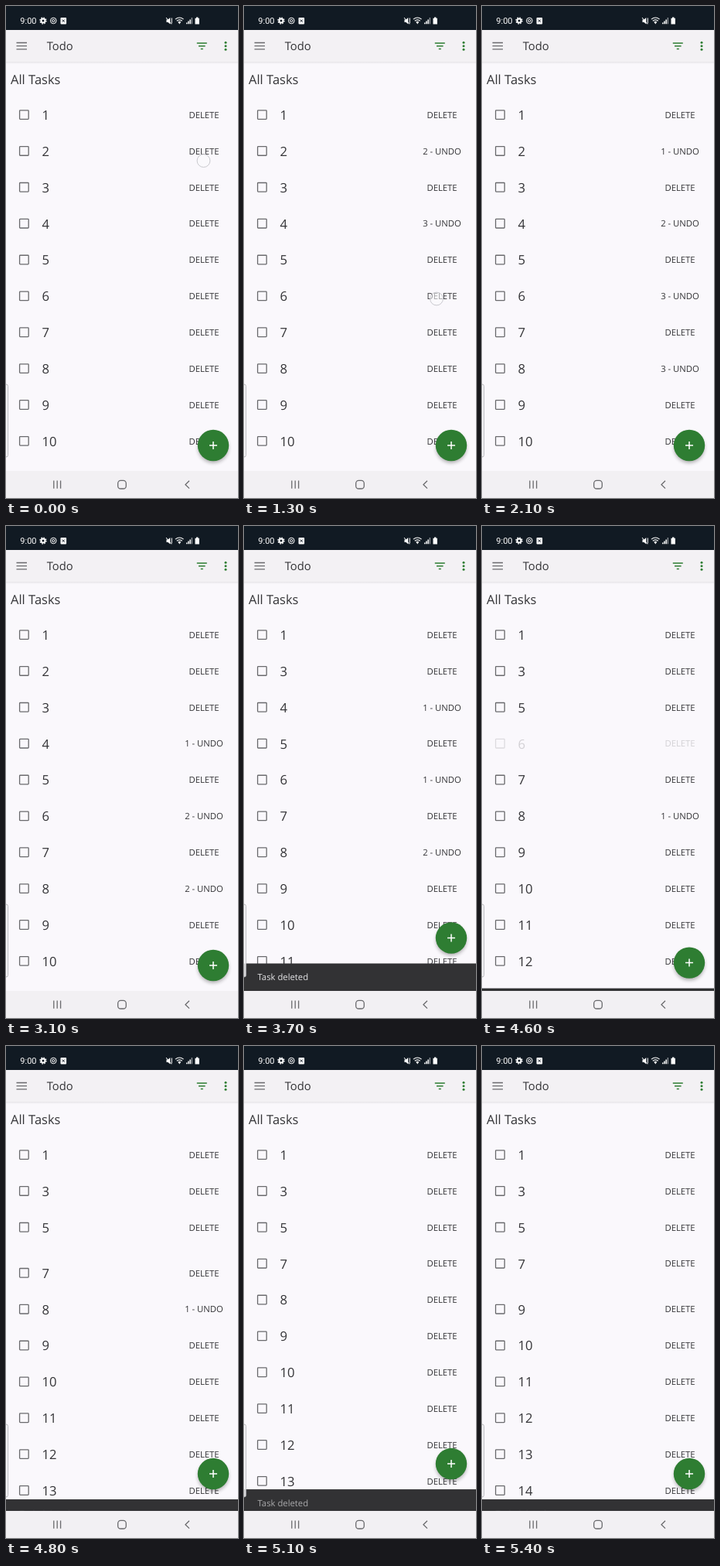
Animation, 300 px wide and 636 px high, one loop 5500 ms. Source, as an HTML page:

```html
<!DOCTYPE html>
<html lang="en">
<head>
<meta charset="utf-8">
<title>Todo</title>
<style>
html, body { margin: 0; width: 100%; height: 100%; overflow: hidden; background: #faf8fc; }
svg { display: block; width: 100%; height: 100%; font-family: "Open Sans", "Noto Sans", sans-serif; fill: #343437; text-rendering: geometricPrecision; }
.clock { font: 11px Roboto, sans-serif; fill: #fff; }
.title { font-size: 14.8px; }
.head { font-size: 16.5px; }
.num { font-size: 16.7px; }
.btn { font-size: 11.3px; text-anchor: middle; }
.note { font-size: 11.3px; fill: #e4e4e6; }
.line { fill: none; stroke: #6a6a6d; stroke-width: 1.3; }
.white { fill: #fff; }
.green { fill: #2e7d32; }
</style>
</head>
<body>
<svg viewBox="0 0 300 636">
  <defs>
    <linearGradient id="edge" x2="0" y2="1">
      <stop offset="0" stop-color="#000" stop-opacity=".08"/>
      <stop offset="1" stop-color="#000" stop-opacity="0"/>
    </linearGradient>
    <filter id="soft" x="-50%" y="-50%" width="200%" height="200%">
      <feGaussianBlur stdDeviation="2.6"/>
    </filter>
  </defs>

  <rect width="300" height="636" fill="#faf8fc"/>
  <text class="head" x="6" y="101">All Tasks</text>
  <g id="list"></g>

  <g id="snack">
    <rect y="565.5" width="300" height="36" fill="#323234"/>
    <text id="note" class="note" x="17.5" y="587">Task deleted</text>
  </g>

  <g id="fab">
    <circle cx="268" cy="571" r="19.5" fill="#000" opacity=".32" filter="url(#soft)"/>
    <circle class="green" cx="268" cy="568" r="20.2"/>
    <path d="M263 568h10M268 563v10" stroke="#fff" stroke-width="1.5"/>
  </g>

  <rect x="-6" y="489" width="8.6" height="94" rx="2.5" fill="#f5f5f7" fill-opacity=".85" stroke="#b4b4b8" stroke-width=".9"/>

  <!-- toolbar -->
  <rect y="72" width="300" height="3" fill="url(#edge)"/>
  <rect y="31" width="300" height="41" fill="#f3f1f4"/>
  <path class="line" d="M13.5 47.5h13.5M13.5 51.7h13.5M13.5 55.9h13.5"/>
  <text class="title" x="52.7" y="57">Todo</text>
  <path d="M246.8 48h13M249 51.7h8.6M251.8 55.4h3" stroke="#2e7d32" stroke-width="1.5"/>
  <g class="green">
    <circle cx="284" cy="47.2" r="1.5"/><circle cx="284" cy="51.7" r="1.5"/><circle cx="284" cy="56.2" r="1.5"/>
  </g>

  <!-- status bar -->
  <rect width="300" height="31" fill="#111a23"/>
  <text class="clock" x="18.3" y="23">9:00</text>
  <g class="white">
    <circle cx="48" cy="19" r="2.5" fill="none" stroke="#fff" stroke-width="2"/>
    <circle cx="48" cy="19" r="4" fill="none" stroke="#fff" stroke-width="1.3" stroke-dasharray="1.6 1.54"/>
    <circle cx="61.3" cy="19" r="3.8" fill="none" stroke="#fff" stroke-width="1"/>
    <circle cx="61.3" cy="19" r="1.6" fill="none" stroke="#fff" stroke-width="1"/>
    <rect x="70.5" y="15" width="7.6" height="8.4" rx="1"/>
    <path d="M72.7 17.6l3.2 3.2m0-3.2l-3.2 3.2" stroke="#111a23"/>
    <path d="M207.5 17.5h2l2.8-2.5v8.4l-2.8-2.5h-2z"/>
    <path d="M207 15l7 8.4M214.3 15.5v7" fill="none" stroke="#fff"/>
    <path d="M219 17.2q5.3-4.4 10.6 0M220.8 19.3q3.5-2.8 7 0" fill="none" stroke="#fff" stroke-width="1.1"/>
    <path d="M222.3 20.6q2-1.5 4 0l-2 2.8z"/>
    <path d="M233 23.3v-1.8h1.5v1.8zM235.2 23.3v-3.8h1.5v3.8zM237.4 23.3v-5.8h1.5v5.8z"/>
    <path d="M239.6 23.3v-8.3h1.5v8.3z" opacity=".5"/>
    <path d="M244.5 15.8h1.5v-1.2h2.4v1.2h1.5v7.8h-5.4z"/>
  </g>

  <!-- navigation bar -->
  <rect y="601" width="300" height="35" fill="#f2f0f3"/>
  <path class="line" d="M61.8 613.5v10.3M66.2 613.5v10.3M70.6 613.5v10.3M237 613.8l-5 4.9 5 4.9"/>
  <rect class="line" x="144.7" y="613.4" width="10.6" height="10.6" rx="3.6"/>

  <circle id="touch" r="8.4" fill="#fafafc" fill-opacity=".55" stroke="#c9c9ce"/>
</svg>
<script>
const LOOP = 5500, STEP = 100, PITCH = 46.86, TOP = 140.7, SNACK = 35.5;

// row -> times at which it shows 3, 2, 1 and then DELETE again
const counts = {
  2: [100, 1100, 2100, 3100],
  4: [700, 1700, 2700, 3800],
  6: [1400, 2400, 3400, 4400],
  8: [1900, 2900, 3900, 5000]
};
const ends = Object.values(counts).map(c => c[3]);
const rises = ends.map((e, i) => e + (i ? 320 : 40));
const falls = ends.slice(1).map(e => e + 40);

// finger contacts: from, to, start x, y, end x, y
const presses = [
  [0, 200, 255.5, 200, 255.5, 200],
  [600, 800, 241, 279, 234, 276],
  [1200, 1500, 250, 379, 247, 377.5],
  [1800, 2000, 248, 473, 248, 472]
];

const $ = id => document.getElementById(id);
const part = (t, from, len) => Math.min(1, Math.max(0, (t - from) / len));
const smooth = p => (1 - Math.cos(p * Math.PI)) / 2;
const bez = (a, b, u) => 3 * a * u * (1 - u) ** 2 + 3 * b * u * u * (1 - u) + u ** 3;

// cubic-bezier(.4, 0, .2, 1)
function slide(p) {
  let lo = 0, hi = 1;
  for (let i = 0; i < 20; i++) {
    const mid = (lo + hi) / 2;
    if (bez(.4, .2, mid) < p) lo = mid; else hi = mid;
  }
  return bez(0, 1, lo);
}

function add(parent, tag, attrs, text = "") {
  const el = document.createElementNS("http://www.w3.org/2000/svg", tag);
  for (const k in attrs) el.setAttribute(k, attrs[k]);
  el.textContent = text;
  return parent.appendChild(el);
}

const rows = Array.from({ length: 15 }, (_, i) => {
  const g = add($("list"), "g", {});
  add(g, "rect", { class: "line", x: 17.6, y: -5.9, width: 11.6, height: 11.6, rx: .8 });
  add(g, "text", { class: "num", x: 46.4, y: 6.3 }, i + 1);
  return { g, label: add(g, "text", { class: "btn", x: 256, y: 4.1 }, "DELETE"), times: counts[i + 1] };
});

const shift = (el, y) => el.setAttribute("transform", `translate(0 ${y.toFixed(2)})`);
const sum = (list, f) => list.reduce((s, from) => s + f(from), 0);

function draw(t) {
  let y = TOP;
  for (const { g, label, times } of rows) {
    shift(g, y);
    y += PITCH;
    if (!times) continue;
    const n = times.filter(s => t >= s).length;
    const text = n % 4 ? `${4 - n} - UNDO` : "DELETE";
    if (label.textContent !== text) label.textContent = text;
    g.setAttribute("opacity", 1 - smooth(part(t, times[3] + 115, 120)));
    y -= PITCH * smooth(part(t, times[3] + 235, 250));
  }

  const move = from => slide(part(t, from, 250));
  const shown = SNACK * (sum(rises, move) - sum(falls, move));
  shift($("snack"), SNACK - shown);
  shift($("fab"), -shown);
  // the message fades in late and out early
  const fadeIn = from => part(t, from + 70, 180), fadeOut = from => part(t, from, 180);
  $("note").setAttribute("opacity", sum(rises, fadeIn) - sum(falls, fadeOut));

  const press = presses.find(p => t >= p[0] && t < p[1]);
  $("touch").style.display = press ? "" : "none";
  if (press) {
    const [from, to, x0, y0, x1, y1] = press, p = part(t, from, to - from);
    $("touch").setAttribute("cx", x0 + (x1 - x0) * p);
    $("touch").setAttribute("cy", y0 + (y1 - y0) * p);
  }
}

const start = performance.now();
function tick() {
  const t = (performance.now() - start) % LOOP;
  draw(Math.floor(t / STEP) * STEP);
  requestAnimationFrame(tick);
}
tick();
</script>
</body>
</html>
```
